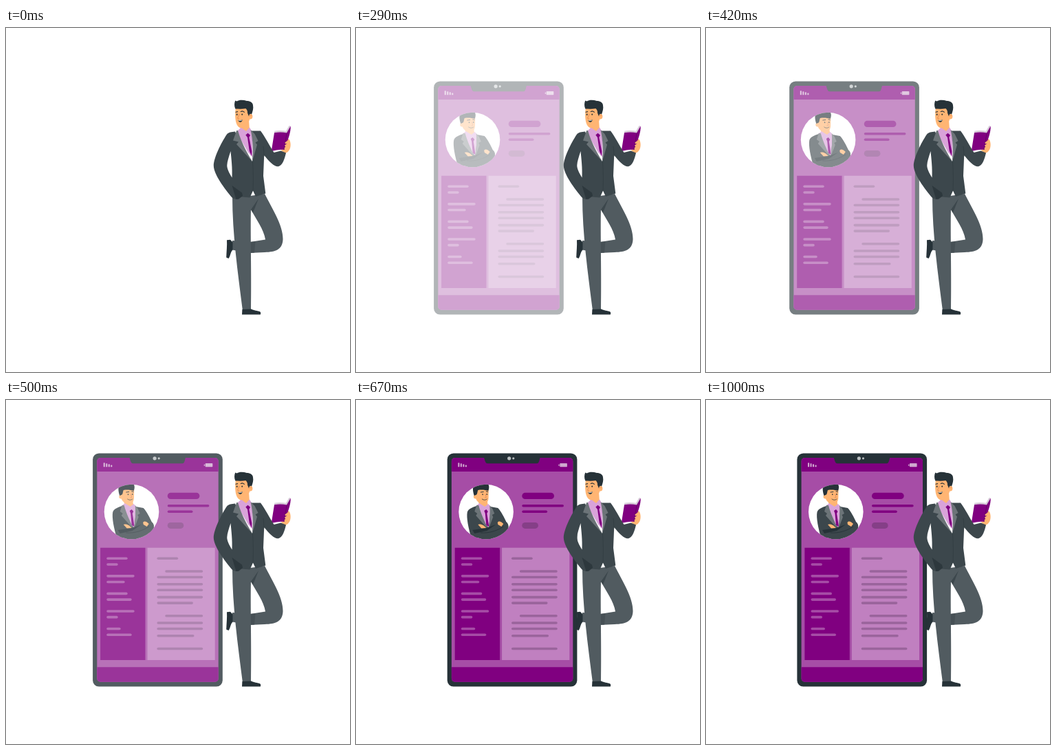
Write an HTML page with a canvas that moves like this. It is 500x500 px and loops after 1040 ms.

```html
<!DOCTYPE html>
<html lang="en">
<head>
<meta charset="utf-8">
<title>Profile on a phone</title>
<style>
html, body { margin: 0; width: 100%; height: 100%; overflow: hidden; background: #fff; }
canvas { display: block; width: 500px; height: 500px; }
</style>
</head>
<body>
<canvas id="stage" width="500" height="500"></canvas>
<script>
const LOOP = 1040, FPS = 24, SLIDE = 30;
const INK = '#263238', JACKET = '#3c474c', CLOTH = '#515b60', LAPEL = '#6c7478';
const PURPLE = '#800080', SCREEN = '#a64da6', LILAC = '#d9a3d9', SKIN = '#ffb573';

const stage = document.getElementById('stage').getContext('2d');
const layer = document.createElement('canvas');
layer.width = layer.height = 500;
const phone = layer.getContext('2d');

function shape(c, color, d) {
  c.fillStyle = color;
  c.fill(new Path2D(d));
}
function line(c, color, width, d) {
  c.strokeStyle = color;
  c.lineWidth = width;
  c.lineCap = c.lineJoin = 'round';
  c.stroke(new Path2D(d));
}
function box(c, color, x, y, w, h, r = 0) {
  c.fillStyle = color;
  c.beginPath();
  c.roundRect(x, y, w, h, r);
  c.fill();
}
function dot(c, color, x, y, rx, ry = rx) {
  c.fillStyle = color;
  c.beginPath();
  c.ellipse(x, y, rx, ry, 0, 0, Math.PI * 2);
  c.fill();
}
// rows: [y, x1, x2]
function rows(c, color, list) {
  for (const [y, x1, x2] of list) box(c, color, x1, y - 1.8, x2 - x1, 3.6, 1.8);
}

function drawPortrait(c) {
  dot(c, '#fff', 188.8, 162.5, 39.8);
  c.save();
  c.beginPath();
  c.arc(188.8, 162.5, 39.8, 0, Math.PI * 2);
  c.clip();
  // neck, shirt, tie
  shape(c, SKIN, 'M177 146L190 143L192 157L181 159Z');
  shape(c, LILAC, 'M174 154L179 150L187 155L192 151L198 158L194 187L183 180Z');
  shape(c, PURPLE, 'M186 161L189 159L191.5 162L190 165L193 184L189 182L187.5 165Z');
  // jacket
  shape(c, JACKET, 'M175 154C169 156 163 158 161.5 163C160 171 163 186 168 203H213L217 193C224 184 221 180 218 177C215 171 211 162 206 157L195 155C195 164 194 176 192.5 186C185 177 178 165 175 154Z');
  shape(c, LAPEL, 'M175 153L172 162L176 165L174 168L191 187C187 176 181 165 178 153Z');
  shape(c, LAPEL, 'M194 153L198 158L201 165L197.5 167L199 170L192.5 187C194 175 195 164 194 153Z');
  // crossed arms
  shape(c, JACKET, 'M169 188C178 184 184 186 191 186L208 178L215 183L219 178C223 185 221 190 216 193C204 198 188 197 172 201Z');
  shape(c, INK, 'M169 189L189 186L203 181L190 190L172 194Z');
  line(c, INK, .8, 'M181 193C193 194 205 190 214 184');
  shape(c, SKIN, 'M177 181C180 179.5 184 181 187 184L189 186L182 186.5Z');
  shape(c, SKIN, 'M205.5 178C207 175.5 210 176 214 180L211 184L206 181Z');
  // head
  shape(c, SKIN, 'M172 131C172 143 175 148 181 150.5C187 152.5 191.5 150 192.3 143L192.5 130L182 126Z');
  dot(c, SKIN, 173.2, 140.5, 2.6, 3);
  shape(c, INK, 'M171.5 139C169 132 169 126 172 122.5C174 120 179 122 183 121C187 120 190 119 192 119.5L191.5 122C194 125 193 129 192 132C188 131 183 130 177 131C176 134 176 138 174 138Z');
  line(c, INK, 1, 'M181 134L185 133.5M189 133L191.5 133.5');
  dot(c, INK, 183.8, 137.2, .8, 1);
  dot(c, INK, 190, 137, .8, 1);
  line(c, '#e78c55', .9, 'M187.7 137L189.2 141.5L187 142');
  line(c, INK, .8, 'M183 144C185.5 146 188.5 145.5 190 144');
  c.restore();
}

function drawPhone(c) {
  box(c, INK, 132.4, 77.4, 188.7, 339.2, 9);
  box(c, SCREEN, 138.6, 84, 176.4, 325.8, 5);
  box(c, PURPLE, 138.6, 84, 176.4, 20, [5, 5, 0, 0]);
  box(c, PURPLE, 138.6, 388.3, 176.4, 21.5, [0, 0, 5, 5]);
  shape(c, INK, 'M185 83C187 84 186.5 92.3 191 92.3H262.5C267 92.3 266 84 268 83Z');
  dot(c, '#b9bec0', 222.4, 84.8, 2.6);
  dot(c, '#b9bec0', 228.5, 84.8, 1.6);

  const light = '#cfa8cf';
  [6, 5, 4, 2.7].forEach((h, i) => box(c, light, 148 + i * 3.5, 97.2 - h, 2.1, h, .5));
  box(c, light, 296, 92, 10.6, 5.2, .7);
  box(c, light, 294, 93.4, 1.4, 2.4, .5);

  drawPortrait(c);

  box(c, PURPLE, 241, 134.8, 46.7, 9.3, 4.6);
  rows(c, PURPLE, [[153.8, 241, 301.7], [162.3, 241, 277.8]]);
  box(c, '#853f87', 241, 177.9, 23.6, 9, 4.5);

  box(c, PURPLE, 143.4, 214.8, 65.4, 163.2);
  box(c, '#c080c0', 211.8, 214.8, 98.2, 163.2);

  const ends = [183, 169, 193, 179, 183, 189, 193, 169, 173, 189];
  rows(c, SCREEN, ends.map((x, i) => [230.3 + (i >> 1) * 25.55 + (i % 2) * 8.7, 152.5, x]));

  const full = [257.5, 267.8, 276.3, 286.6, 324, 332.5, 361.5];
  rows(c, '#9a649c', full.map(y => [y, 225.7, 292.5]));
  rows(c, '#9a649c', [[230.3, 225.7, 256.5], [249, 237.5, 292.5], [295.1, 225.7, 278.3],
    [313.8, 237.5, 292.5], [342.8, 225.7, 279.8]]);
}

function drawMan(c) {
  // raised leg
  shape(c, CLOTH, 'M341 246L376 241C386 261 403 287 402.5 307C402 322 392 325.5 376 326L354 327L329 322.5V309L355 311L377 307.5C375 293 363 277 356 264Z');
  shape(c, JACKET, 'M356 264L367 248L359 268.5Z');
  shape(c, '#465055', 'M354 311L362.5 310.5L361 326.5L354 327Z');
  shape(c, INK, 'M321 308.3L326 307.8L329.5 311.5V322.5C326.5 325 326 332 323.5 335L320.2 333.5C320.5 325 321.5 316 321 308.3Z');
  // standing leg
  shape(c, CLOTH, 'M329 244H364L356 264C355 295 357 355 356 409.5H343.8C337 355 329 300 329 244Z');
  shape(c, INK, 'M343.4 409L356.5 408.6C360 410.8 366 411 369 412.3C370.5 413.2 370.4 415 369.8 416.4H343Z');

  // hand with book
  shape(c, SKIN, 'M405 166C407 163 409 160 411.5 162C414 165 414.3 172 412.5 176C411 179.5 408 181.5 405.5 182L400 178Z');
  shape(c, '#d6cbd8', 'M390.2 149.8C396 148.3 402 149 407 149.8L411.5 142L413.3 142.6L409 154L390 153Z');
  shape(c, PURPLE, 'M390 152.3C397 151 403 151.5 408 152.5L413.7 142.5C414.2 150 411 160 404.5 177C399 176.5 391 177.5 385.7 179.3Z');
  line(c, '#5c005c', .7, 'M408.3 153L403.7 176.5');
  line(c, SKIN, 2.4, 'M411 164L406.7 167M411.5 168L406.3 171M410.5 172L405.7 174.7');

  // shirt and tie
  shape(c, SKIN, 'M341 141L353 134L354 148L348 155L341 148Z');
  shape(c, LILAC, 'M336 150L341.5 144.5L349 150L354 144.5L358 151L358.5 188L352 181L340 160Z');
  shape(c, PURPLE, 'M348.3 155.5L351.5 152.8L355 155.7L353.3 159L357.3 179L357 186L353.8 179L351 159Z');

  // jacket
  shape(c, JACKET, 'M333 150.5C328 151 323.5 151.5 321 154.5C312 168 302 189 301.8 200C302 213 318 234 329 247L334 249L337 245L354.5 246.5L359 236.5L363 245L377.3 240.5L374 215L375.2 185C384 196 391 202.5 396.5 201C402 199.5 405 190 407 181.5L399.5 178.5L389.5 181C384 173 376 157 370 149.5L356.5 149.5C360 162 360 178 358 194C348 181 338 164 333 150.5ZM326.5 179C327.5 190 329.2 203 328.5 217.5C324.5 211 321 204 321.3 199.5C321.5 194 324 187 326.5 179Z');
  shape(c, LAPEL, 'M335.2 149L330 163.5L338 165.5L335 169L358 194C351 182 343 169 337 149Z');
  shape(c, LAPEL, 'M355.5 148L361.5 154L366.5 164L362.5 166.5L365 169.5L358 194C359.5 180 359 163 355.5 148Z');
  shape(c, '#2d383d', 'M328.5 229L343 239.5L344 244L338 248.7L334.5 249Z');
  line(c, '#303b40', .7, 'M358.5 194C359.5 208 359.5 222 359 236M374 172L375.2 186');

  // head
  shape(c, SKIN, 'M334 116C332.5 124 333 134 335.2 139.5C337 144 341 147 345 144.3C350 141 354 136 355 130L353 115L341 112Z');
  dot(c, SKIN, 355.2, 128.6, 3.2, 3.9);
  shape(c, INK, 'M333.3 117.5C331.5 113 331.8 109 333.2 105.5L335.5 106.5C339 104.2 345 104.3 350 106C355 106 358.8 108.5 359 112.5C360 117 358.5 121 357 125.5C355 123.8 353.4 125.5 353 128.5L351 123.5C351.3 120.5 350 118.5 348.5 117C343 118 338 117.5 333.3 117.5Z');
  line(c, INK, 1.1, 'M334 122.3L336.6 121.6M341.2 121.6C343 120.5 345 121 346.3 122.3');
  dot(c, INK, 335.7, 125.8, .9, 1.2);
  dot(c, INK, 343.2, 125.6, .9, 1.2);
  line(c, '#e78c55', 1, 'M339 125.5C338.3 128 337 130 336.3 131.2L338.6 131.8');
  shape(c, INK, 'M337.3 133.6C339.5 134.6 341.5 134.2 343.6 133C343.5 136 341.5 137.3 339.7 136.8C338.3 136.3 337.5 135 337.3 133.6Z');
  line(c, '#fff', .8, 'M338.3 134.4C340 135 341.5 134.7 342.8 134');
  line(c, '#e78c55', .8, 'M354.2 128C355 126.8 356 126.7 357 127.3');
}

// Cubic Bezier timing with a slight overshoot
function ease(x) {
  const at = (s, a, b) => 3 * (1 - s) * (1 - s) * s * a + 3 * (1 - s) * s * s * b + s * s * s;
  if (x >= 1) return 1;
  let lo = 0, hi = 1;
  for (let i = 0; i < 30; i++) {
    const mid = (lo + hi) / 2;
    if (at(mid, .36, .5) < x) lo = mid; else hi = mid;
  }
  return at(lo, -.01, 1.38);
}

function render(ms) {
  // 24 steps a second, rounded to hundredths
  const t = Math.floor(ms % LOOP / 10) * 10;
  const step = Math.ceil((t + 4.9) * FPS / 1000) - 1;

  stage.fillStyle = '#fff';
  stage.fillRect(0, 0, 500, 500);
  if (step >= 3) {
    const p = ease((step + .6) / FPS);
    phone.clearRect(0, 0, 500, 500);
    phone.save();
    phone.translate(SLIDE * (p - 1), 0);
    drawPhone(phone);
    phone.restore();
    stage.globalAlpha = Math.max(0, Math.min(1, p));
    stage.drawImage(layer, 0, 0);
    stage.globalAlpha = 1;
  }
  drawMan(stage);
}

const start = performance.now();
function tick() {
  render(performance.now() - start);
  requestAnimationFrame(tick);
}
tick();
</script>
</body>
</html>
```
